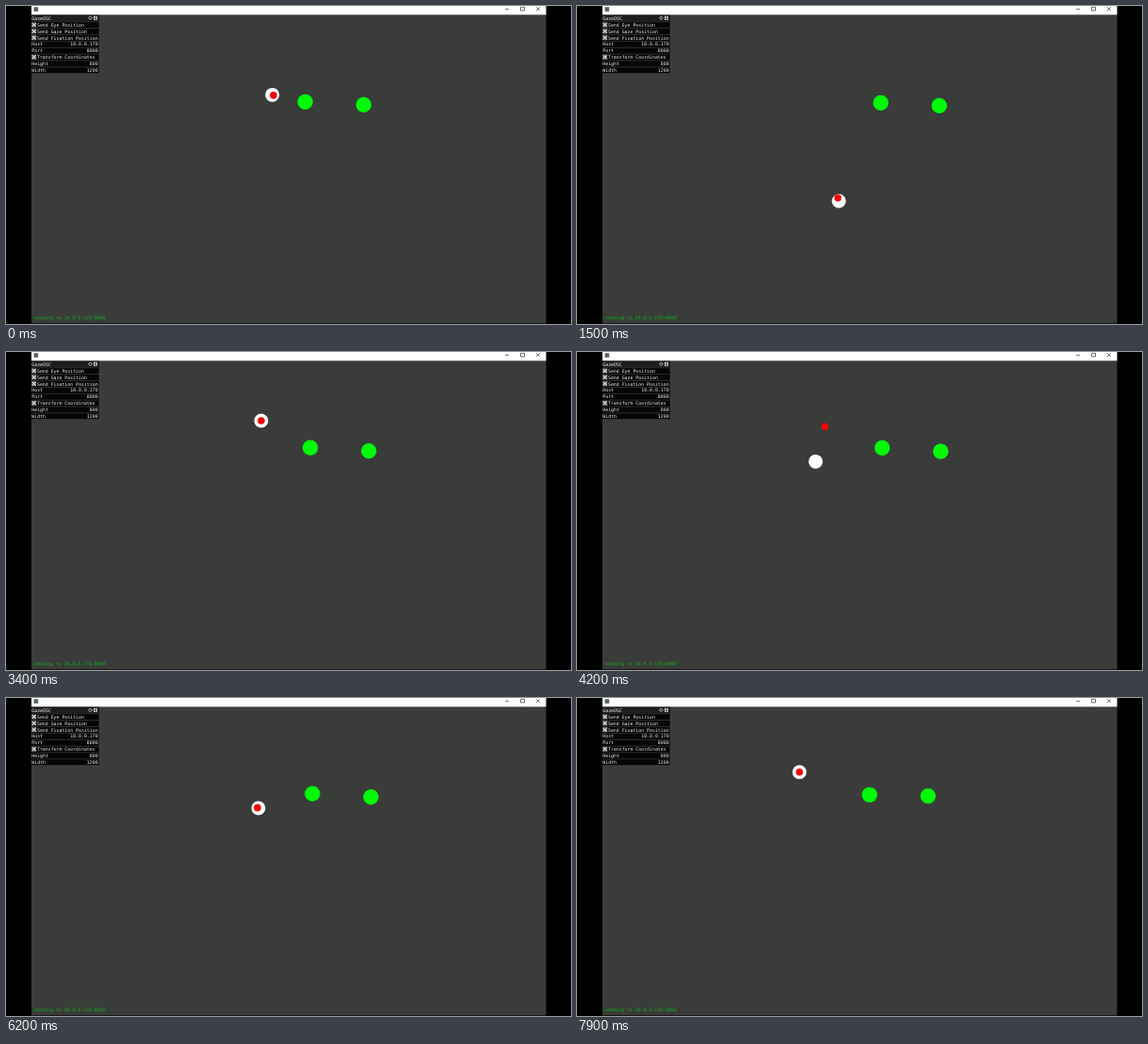
Animation of 600x338 px, one loop 8000 ms. Source, as an HTML page:

```html
<!DOCTYPE html>
<html lang="en">
<head>
<meta charset="utf-8">
<title>Gaze view</title>
<style>
html, body { margin: 0; width: 100%; height: 100%; overflow: hidden; background: #000; }
svg { display: block; width: 100vw; height: 100vh; }
text { font: 4.88px "DejaVu Sans Mono", "Liberation Mono", monospace; fill: #f2f2f2; white-space: pre; }
</style>
</head>
<body>
<svg viewBox="0 0 600 338">
  <rect width="600" height="338" fill="#000"/>
  <rect x="27" width="546.5" height="337.4" fill="#3a3c39"/>
  <rect x="27" width="546.5" height="9.3" fill="#fff"/>
  <rect x="29.6" y="1.2" width="4.6" height="4.6" fill="#53645f"/>
  <g fill="none" stroke="#333" stroke-width=".7">
    <path d="M530 3.3h4M563 1.2l3.8 3.8M563 5l3.8 -3.8"/>
    <rect x="546.7" y="1.2" width="3.7" height="3.7"/>
  </g>
  <g id="panel">
    <rect x="27" y="9.8" width="71.6" height="61.4" fill="#050505"/>
    <rect x="27" y="9.8" width="71.6" height="6.3" fill="#1d1d1d"/>
    <g fill="none" stroke="#ddd" stroke-width=".8">
      <rect x="-1.3" y="-1.3" width="2.6" height="2.6" transform="translate(89.4 12.8) rotate(45)"/>
      <rect x="93.5" y="11.2" width="2.9" height="3.3"/>
      <path d="M93.5 12.8h2.9"/>
    </g>
  </g>
  <text x="29.3" y="333.3" style="fill:#0bb51a">sending to 10.0.0.170:8000</text>
  <clipPath id="window"><rect x="27" y="9.3" width="546.5" height="328"/></clipPath>
  <g clip-path="url(#window)">
    <circle id="leftEye" r="8.2" fill="#00fa08"/>
    <circle id="rightEye" r="8.2" fill="#00fa08"/>
    <circle id="fixation" r="7.5" fill="#fff"/>
    <circle id="gaze" r="3.8" fill="#f2040a"/>
  </g>
</svg>
<script>
const LOOP = 8000, STEP = 100, LEAD = 100, EYE_GAP = 62.1;
const byId = id => document.getElementById(id);

function add(parent, tag, attrs, content = "") {
  const el = document.createElementNS("http://www.w3.org/2000/svg", tag);
  for (const key in attrs) el.setAttribute(key, attrs[key]);
  el.textContent = content;
  parent.append(el);
}

// label, value; a value of true is a checked toggle
const rows = [
  ["GazeOSC"], ["Send Eye Position", true], ["Send Gaze Position", true],
  ["Send Fixation Position", true], ["Host", "10.0.0.170"], ["Port", "8000"],
  ["Transform Coordinates", true], ["Height", "800"], ["Width", "1200"]
];
rows.forEach(([label, value], i) => {
  const panel = byId("panel"), y = 15 + i * 6.87, toggle = value === true;
  if (i) add(panel, "path", { d: `M27 ${y - 5.1}h71.6`, stroke: "#4b4b4b", "stroke-width": .6 });
  if (toggle) {
    add(panel, "rect", { x: 27.2, y: y - 4.4, width: 5, height: 5, fill: "#777" });
    add(panel, "path", { d: `M27.7 ${y - 3.9}l4 4m0-4l-4 4`, stroke: "#fff", "stroke-width": .9 });
  }
  add(panel, "text", { x: toggle ? 33 : 27.3, y }, label);
  if (value && !toggle) add(panel, "text", { x: 97.6, y, "text-anchor": "end" }, value);
});

// time, left eye x and y, drop of the right eye
const eyes = [
  [0, 317.7, 102, 3], [1500, 322.6, 103, 3], [2600, 322.2, 101.6, 3.4],
  [4200, 324.1, 102, 3.6], [5400, 327, 101.4, 4], [6300, 325.2, 101.8, 3.4],
  [6800, 317.7, 102.2, 2.5], [7900, 310.7, 102.9, 1.3]
];

// time, x, y of the point looked at
const sight = [
  [0, 282.8, 94.4], [100, 284, 94.9], [800, 284, 92], [1200, 277, 212],
  [1500, 278.1, 207.2], [1600, 277, 204], [1800, 279, 205], [2200, 537, 150],
  [2400, 320, 88], [2600, 310.2, 85], [3000, 300, 84], [3300, 271, 73],
  [3700, 271, 73], [4000, 230, 188], [4200, 253.4, 116.4], [4300, 263.3, 79.4],
  [4700, 212, 75], [5200, 268, 37], [5600, 269.7, 36.7], [5900, 565, 75],
  [6200, 268, 117], [6500, 265, 116], [6800, 292.9, 87.7], [7200, 288, 88],
  [7900, 236.2, 78.7]
];

function sample(track, t) {
  const next = track.findIndex(key => key[0] > t);
  if (next < 0) return track.at(-1).slice(1);
  const a = track[next - 1], b = track[next];
  const k = (t - a[0]) / (b[0] - a[0]);
  return a.slice(1).map((v, i) => v + (b[i + 1] - v) * k);
}

function place(id, x, y) {
  byId(id).setAttribute("cx", x);
  byId(id).setAttribute("cy", y);
}

function draw(time) {
  const t = Math.floor((time % LOOP) / STEP) * STEP;
  const [x, y, drop] = sample(eyes, t);
  place("leftEye", x, y);
  place("rightEye", x + EYE_GAP, y + drop);
  place("fixation", ...sample(sight, t));
  place("gaze", ...sample(sight, t + LEAD));
}

const start = performance.now();
function tick() {
  draw(performance.now() - start);
  requestAnimationFrame(tick);
}
tick();
</script>
</body>
</html>
```
